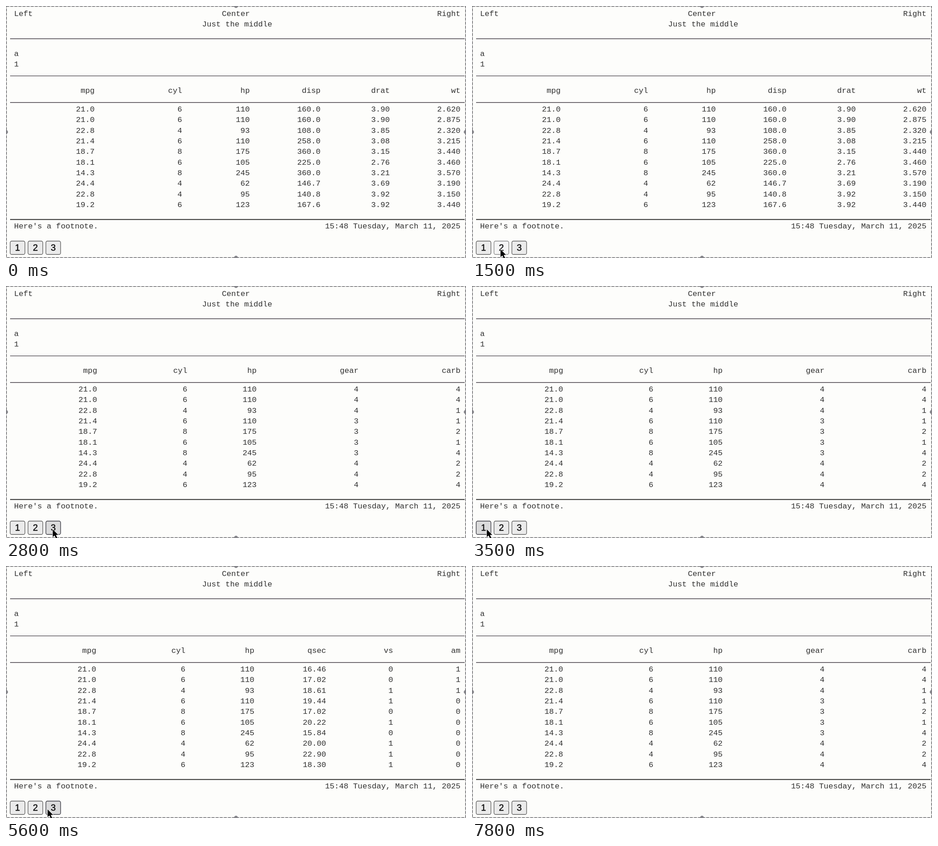
Recreate the animation shown at these times as an HTML page. Size 1011 px wide and 554 px high, loop 7.9 s.

```html
<!DOCTYPE html>
<html lang="en">
<head>
<meta charset="utf-8">
<title>Paged table</title>
<style>
  html, body { margin: 0; width: 100%; height: 100%; overflow: hidden; background: #fdfdfb; }
  svg { display: block; width: 1011px; height: 554px; }
  text { font: 17.1px "Liberation Mono", "Courier New", monospace; fill: #303030; white-space: pre; }
  .rule { stroke: #453f47; stroke-width: 1.4; }
  .rule.last { stroke: #161616; stroke-width: 1.7; }
  .button rect { fill: #ebebeb; stroke: #626262; stroke-width: 1.4; }
  .button.hover rect { fill: #dadadb; stroke: #3c3c44; }
  .button.down rect { fill: #f5f5f5; stroke: #8a8a8a; }
  .button text { font: 20px "Liberation Sans", Arial, sans-serif; fill: #0c0c0c;
    stroke: #0c0c0c; stroke-width: .4; text-anchor: middle; }
  .edge { fill: none; stroke: #d8d8d8; stroke-width: 2.4; }
  .dash { stroke: #858588; stroke-dasharray: 6 3; }
  .handle { fill: #85858a; }
  .arrow { fill: #000; stroke: #fff; stroke-width: 1.6; stroke-linejoin: round; paint-order: stroke; }
</style>
</head>
<body>
<svg id="stage" viewBox="0 0 1011 554"></svg>
<script>
const LOOP = 7900, STEP = 100, LEFT = 17.8, RIGHT = 998.8;
const stage = document.getElementById('stage');

function add(parent, tag, attrs, content) {
  const el = document.createElementNS('http://www.w3.org/2000/svg', tag);
  for (const key in attrs) el.setAttribute(key, attrs[key]);
  if (content !== undefined) el.textContent = content;
  parent.appendChild(el);
  return el;
}
const label = (parent, x, y, content, anchor = 'start') =>
  add(parent, 'text', { x, y, 'text-anchor': anchor }, content);

// Titles, footnote and rules
label(stage, LEFT, 22, 'Left');
label(stage, 505.3, 22, 'Center', 'middle');
label(stage, RIGHT, 22, 'Right', 'end');
label(stage, 508, 45.2, 'Just the middle', 'middle');
label(stage, LEFT, 109.5, 'a');
label(stage, LEFT, 132.5, '1');
label(stage, LEFT, 489.2, "Here's a footnote.");
label(stage, RIGHT, 489.2, '15:48 Tuesday, March 11, 2025', 'end');
for (const y of [72, 153.6, 212.3, 469.3])
  add(stage, 'line', { x1: 9, x2: 1008, y1: y, y2: y, class: y > 400 ? 'rule last' : 'rule' });

// Table pages: a column is its heading followed by its cells
const shared = [
  'mpg 21.0 21.0 22.8 21.4 18.7 18.1 14.3 24.4 22.8 19.2',
  'cyl 6 6 4 6 8 6 8 4 4 6',
  'hp 110 110 93 110 175 105 245 62 95 123'
];
const tables = [
  { right: [194.8, 387, 535.8, 691.2, 843.5, RIGHT], own: [
    'disp 160.0 160.0 108.0 258.0 360.0 225.0 360.0 146.7 140.8 167.6',
    'drat 3.90 3.90 3.85 3.08 3.15 2.76 3.21 3.69 3.92 3.92',
    'wt 2.620 2.875 2.320 3.215 3.440 3.460 3.570 3.190 3.150 3.440'] },
  { right: [198.4, 394.3, 545.8, 703.6, 850.8, RIGHT], own: [
    'qsec 16.46 17.02 18.61 19.44 17.02 20.22 15.84 20.00 22.90 18.30',
    'vs 0 0 1 1 0 1 0 1 1 1',
    'am 1 1 1 0 0 0 0 0 0 0'] },
  { right: [200.4, 398.4, 550.8, 774.8, RIGHT], own: [
    'gear 4 4 4 3 3 3 3 4 4 4',
    'carb 4 4 1 1 2 1 4 2 2 4'] }
];
const rowY = row => row ? 208.8 + row * 23.33 : 191.3;
const pages = tables.map(({ right, own }) => {
  const group = add(stage, 'g', {});
  [...shared, ...own].forEach((column, c) =>
    column.split(' ').forEach((cell, row) => label(group, right[c], rowY(row), cell, 'end')));
  return group;
});

// Buttons
const SIZE = 32.4;
const buttons = pages.map((_, i) => {
  const x = 9.2 + i * 39.2;
  const group = add(stage, 'g', { class: 'button' });
  add(group, 'rect', { x, y: 516.7, width: SIZE, height: 29.6, rx: 3.6 });
  label(group, x + SIZE / 2, 538.2, i + 1, 'middle');
  return { group, x };
});

// Selection frame
for (const name of ['edge', 'edge dash'])
  add(stage, 'rect', { x: 0.6, y: 0.6, width: 1009.8, height: 552.8, class: name });
for (const [cx, cy] of [[505.5, 0], [505.5, 553.5], [0, 277], [1010.5, 277]])
  add(stage, 'circle', { cx, cy, r: 4.4, class: 'handle' });

const arrow = add(stage, 'path', {
  class: 'arrow', d: 'M0 0V17L4 13.4L7 20L10 18.7L7 12.3H12.2Z'
});

// Pointer stops; it rests around each time, and a page opens where one is named
const OUT = 558, ON = 535, REST_BEFORE = 300, REST_AFTER = 400;
const stops = [
  { time: 400, x: 84, y: OUT },
  { time: 1600, x: 62.7, y: ON, page: 1 },
  { time: 2600, x: 102.7, y: ON, page: 2 },
  { time: 3800, x: 32.5, y: ON, page: 0 },
  { time: 4900, x: 66, y: ON, page: 1 },
  { time: 5800, x: 91.4, y: ON, page: 2 },
  { time: 6800, x: 111.8, y: ON + 1 },
  { time: 7800, x: 126, y: OUT }
];
const clicks = stops.filter(stop => 'page' in stop);
const ease = u => u * u * (3 - 2 * u);

function pointer(t) {
  const i = stops.findIndex(stop => stop.time + REST_AFTER > t);
  if (i < 1) return null;
  const a = stops[i - 1], b = stops[i];
  const from = a.time + REST_AFTER, to = b.time - REST_BEFORE;
  const k = ease(Math.min(1, (t - from) / (to - from)));
  return { x: a.x + (b.x - a.x) * k, y: a.y + (b.y - a.y) * k };
}

function draw(now) {
  const t = Math.floor((now % LOOP) / STEP) * STEP;
  const at = pointer(t);
  const down = clicks.some(({ time }) => t >= time - STEP && t < time);
  const shown = clicks.reduce((page, click) => t >= click.time ? click.page : page, 0);

  pages.forEach((page, i) => page.setAttribute('visibility', i === shown ? 'visible' : 'hidden'));
  buttons.forEach(({ group, x }) => {
    const over = at && at.x > x && at.x < x + SIZE && at.y < 546.5;
    group.setAttribute('class', 'button' + (over ? (down ? ' down' : ' hover') : ''));
  });
  const visible = at && at.y < OUT;
  arrow.setAttribute('visibility', visible ? 'visible' : 'hidden');
  if (visible) arrow.setAttribute('transform', `translate(${at.x} ${at.y})`);
}

const start = performance.now();
function tick() {
  draw(performance.now() - start);
  requestAnimationFrame(tick);
}
tick();
</script>
</body>
</html>
```
